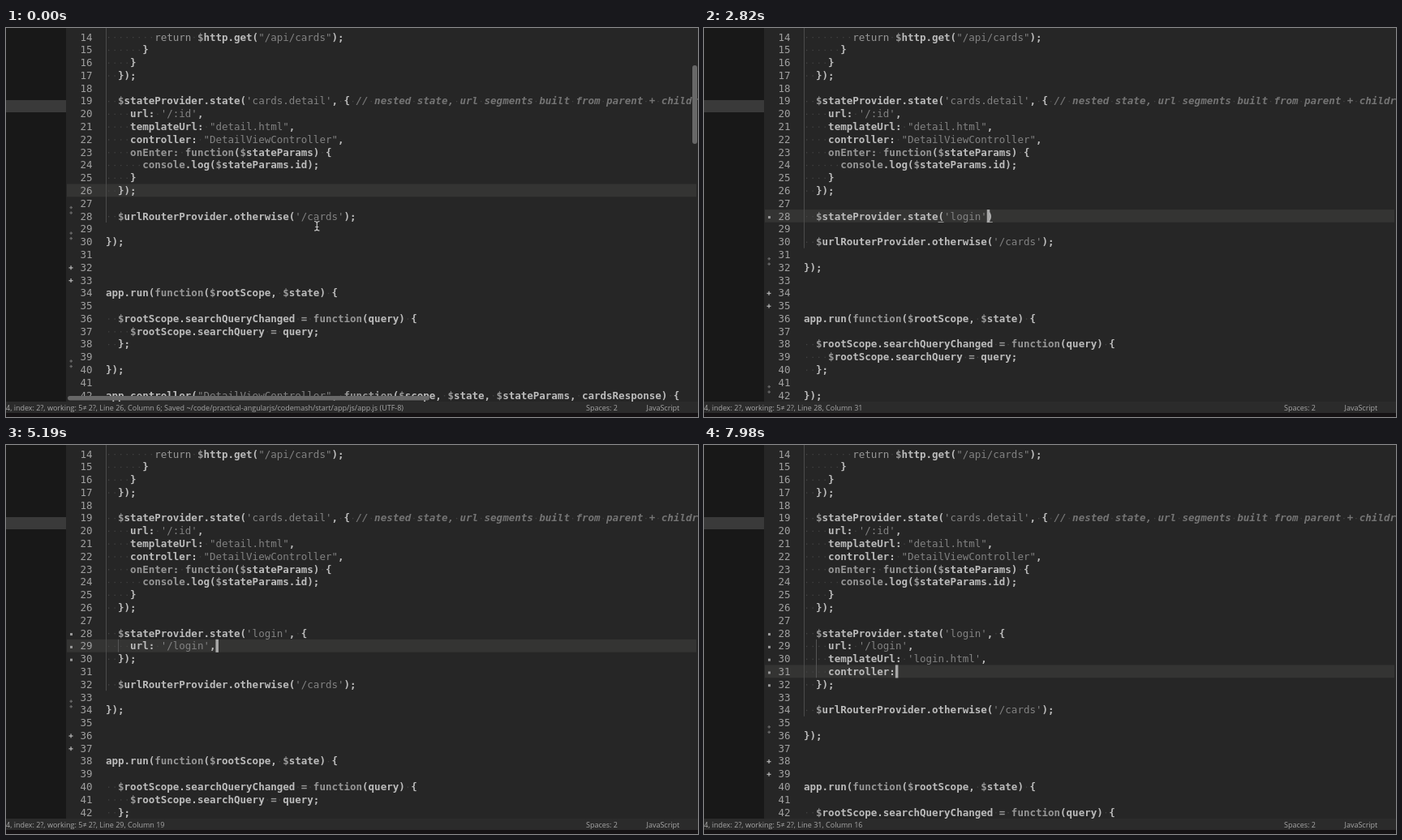
These frames come from a looping animation (853 px wide and 480 px high, 8000 ms). An HTML page with a canvas:

```html
<!DOCTYPE html>
<html lang="en">
<head>
<meta charset="utf-8">
<title>Code editor</title>
<style>
html, body { margin: 0; width: 100%; height: 100%; overflow: hidden; background: #262626; }
canvas { display: block; }
</style>
</head>
<body>
<canvas id="stage" width="853" height="480"></canvas>
<script>
const ctx = document.getElementById('stage').getContext('2d');
const LOOP = 8000, LEFT = 123, CHAR = 7.525, ROW = 15.79, FIRST = 14;
const MONO = '12.5px "DejaVu Sans Mono", monospace';
const SANS = '9px "Open Sans", sans-serif';

const head = `        return $http.get("/api/cards");
      }
    }
  });

  $stateProvider.state('cards.detail', { // nested state, url segments built from parent + children
    url: '/:id',
    templateUrl: "detail.html",
    controller: "DetailViewController",
    onEnter: function($stateParams) {
      console.log($stateParams.id);
    }`.split('\n');

const tail = `  $urlRouterProvider.otherwise('/cards');

});



app.run(function($rootScope, $state) {

  $rootScope.searchQueryChanged = function(query) {
    $rootScope.searchQuery = query;
  };

});

app.controller("DetailViewController", function($scope, $state, $stateParams, cardsResponse) {`.split('\n');

const words = ('state states stateParams stateProvider stateChangeSuccess pushState isDetailState ' +
  'setManaFilter urlRouterProvider templateUrl user controller console cardsResponse').split(' ');
const files = ['app.js', 'auth.js', 'card_filter.js'];

// Each step holds the text from line 26 on; "|" is the caret.
const steps = [];
const step = (time, text, menu) => steps.push({ time, text, menu });
const edit = (time, text, menu) => step(time, '  });\n\n' + text + '\n', menu);
function type(time, gap, before, word, after, menu) {
  for (let i = 1; i <= word.length; i++)
    edit(time + (i - 1) * gap, before + word.slice(0, i) + '|' + after, menu);
}

step(0, '  });|\n');
step(450, '  });\n  |\n');
edit(650, '  |');
type(760, 80, '  ', '$stat', '', 'words');
type(1180, 110, '  $stat', 'ePr', '', 'words');
let code = '  $stateProvider';
edit(1560, code + '|');
type(1800, 90, code, '.', '');
type(1900, 80, code + '.', 'state', '', 'words');
code += '.state(';
edit(2280, code + '|)');
edit(2400, code + "'|')");
type(2480, 60, code + "'", 'login', "')");
code += "'login'";
edit(2780, code + '|)');
type(3010, 100, code, ', ', ')');
code += ', {';
edit(3250, code + '|})');
edit(3500, code + '});|');
edit(3750, code + '|});');
code += '\n    ';
const close = '\n  });';
edit(3900, code + '|' + close);
type(4260, 100, code, 'url', close, 'words');
type(4560, 80, code + 'url', ': ', close);
code += 'url: ';
edit(4720, code + "'|'" + close);
type(4780, 50, code + "'", '/login', "'" + close);
type(5080, 70, code + "'/login", "',", close);
code += "'/login',\n    ";
edit(5380, code + '|' + close);
type(5480, 70, code, 'temp', close, 'words');
code += 'templateUrl';
edit(5800, code + '|' + close);
type(5900, 80, code, ': ', close);
code += ': ';
edit(6120, code + "'|'" + close, 'files');
type(6420, 70, code + "'", 'login.html', "'" + close);
type(7130, 90, code + "'login.html", "',", close);
code += "'login.html',\n    ";
edit(7340, code + '|' + close);
type(7440, 80, code, 'cont', close, 'words');
edit(7800, code + 'controller|' + close);
edit(7900, code + 'controller:|' + close);

const rowY = line => 11 + (line - FIRST) * ROW;
const colX = col => LEFT + col * CHAR;

function rect(color, x, y, w, h) {
  ctx.fillStyle = color;
  ctx.fillRect(x, y, w, h);
}
function write(text, x, y, color, font) {
  ctx.font = font;
  ctx.fillStyle = color;
  ctx.fillText(text, x, y);
}

const tokens = /(\/\/.*)|('[^']*'?|"[^"]*"?)|(return|function|console|log|onEnter:|searchQueryChanged|=|\$)|([^\s'"$=]+?(?=\s|'|"|\$|=|function|$))/g;
function drawCode(text, line) {
  const y = rowY(line) + 4.5;
  [...text].forEach((c, i) => {
    if (c === ' ') rect('#444', colX(i) + 3, y - 4.5, 1.3, 1.3);
  });
  for (const m of text.matchAll(tokens)) {
    const [part, comment, string, soft] = m;
    const color = comment ? '#747474' : string ? '#828282' : soft ? '#979797' : '#bcbcbc';
    const style = comment ? 'italic bold ' : string || part === 'return' ? '' : 'bold ';
    write(part, colX(m.index), y, color, style + MONO);
  }
}

function suggestions(word) {
  const key = word.toLowerCase();
  const fuzzy = new RegExp([...key].join('.*'), 'i');
  const found = words.filter(w => fuzzy.test(w));
  const starts = w => w.toLowerCase().startsWith(key);
  return [...found.filter(starts), ...found.filter(w => !starts(w))].slice(0, 8);
}

function drawMenu(kind, before, line) {
  const word = before.match(/\w*$/)[0];
  const items = kind === 'files' ? files : suggestions(word);
  const textX = colX(before.length - word.length);
  const x = textX - 5, y = rowY(line) + 10;
  rect('#161616', x, y, 228, items.length * 22.5 + 3);
  rect('#343433', x + 2, y + 1, 224, 21.5);
  items.forEach((item, i) =>
    write(item, textX, y + 15.5 + i * 22.5, i ? '#858585' : '#969696', 'bold ' + MONO));
}

function drawMarks(extra, blockSize) {
  for (let i = 0; i < blockSize; i++) rect('#9a9a9a', 79, rowY(28 + i), 3, 3);
  for (const line of [32, 33]) {
    const y = rowY(line + extra) + 0.5;
    rect('#b0b0b0', 77.5, y - 0.5, 5, 1.3);
    rect('#b0b0b0', 79.4, y - 2.5, 1.3, 5);
  }
  for (const line of blockSize ? [30, 40] : [28, 30, 40]) {
    const y = rowY(line + extra) - 8;
    for (const dy of [-2.5, 4]) {
      rect('#666', 78.5, y + dy - 0.7, 3.5, 1.4);
      rect('#666', 79.5, y + dy - 1.7, 1.4, 3.4);
    }
  }
}

function drawBars(alpha) {
  ctx.globalAlpha = alpha;
  ctx.fillStyle = '#686868';
  for (const box of [[846, 46, 6, 97], [76, 454, 446, 5.5]]) {
    ctx.beginPath();
    ctx.roundRect(...box, 3);
    ctx.fill();
  }
  ctx.globalAlpha = 1;
}

function drawPointer() {
  ctx.strokeStyle = '#c4c4c4';
  ctx.lineWidth = 1.2;
  ctx.beginPath();
  ctx.moveTo(380, 238.5);
  ctx.quadraticCurveTo(383.3, 238.5, 383.3, 241);
  ctx.lineTo(383.3, 248);
  ctx.quadraticCurveTo(383.3, 250, 380, 250);
  ctx.moveTo(386.5, 238.5);
  ctx.quadraticCurveTo(383.3, 238.5, 383.3, 241);
  ctx.moveTo(383.3, 248);
  ctx.quadraticCurveTo(383.3, 250, 386.5, 250);
  ctx.moveTo(381.3, 245.5);
  ctx.lineTo(385.3, 245.5);
  ctx.stroke();
}

function draw(now) {
  const { time, text, menu } = steps.findLast(s => s.time <= now);
  const idle = time === 0;
  const typed = text.slice(0, text.indexOf('|')).split('\n');
  const before = typed[typed.length - 1];
  const line = 25 + typed.length, col = before.length;
  const lines = text.replace('|', '').split('\n');
  const extra = lines.length - 2;
  const blockSize = Math.max(0, lines.length - 3);
  const current = lines[line - 26];
  const y = rowY(line);

  rect('#262626', 0, 0, 853, 480);
  rect('#181818', 0, 0, 74, 461);
  rect('#3a3a3a', 0, 89, 74, 15);
  rect('#343433', 75, y - 8, 776, ROW);

  rect('#4b4b4b', LEFT, 0, 1, rowY(28 + extra) + 8);
  if (blockSize > 2) rect('#555', 138, rowY(29) - 8, 1, (blockSize - 2) * ROW);

  [...head, ...lines, ...tail].forEach((row, i) => {
    const n = FIRST + i;
    if (n > 42) return;
    write(n, 91.5, rowY(n) + 4.5, '#a0a0a0', MONO);
    drawCode(row, n);
  });
  drawMarks(extra, blockSize);

  if (current[col] === ')')
    for (const c of [col, current.lastIndexOf('(', col - 1)])
      rect('#999', colX(c), y + 7, 7, 1);
  if (!idle && (now - time) % 1000 < 500) rect('#a8a8a8', colX(col), y - 8, 3.5, 16);
  if (menu) drawMenu(menu, before, line);

  if (idle) drawPointer();
  if (now < 600) drawBars(Math.min(1, (600 - now) / 200));

  rect('#2b2b2b', 0, 461, 853, 14);
  rect('#151214', 0, 475, 853, 5);
  const saved = idle ? '; Saved ~/code/practical-angularjs/codemash/start/app/js/app.js (UTF-8)' : '';
  const status = `4, index: 2?, working: 5≠ 2?, Line ${line}, Column ${col + 1}${saved}`;
  write(status, 0, 472, '#a6a6a6', SANS);
  write('Spaces: 2', 715, 472, '#a6a6a6', SANS);
  write('JavaScript', 789.5, 472, '#a6a6a6', SANS);
}

const start = performance.now();
function tick() {
  draw((performance.now() - start) % LOOP);
  requestAnimationFrame(tick);
}
tick();
</script>
</body>
</html>
```
